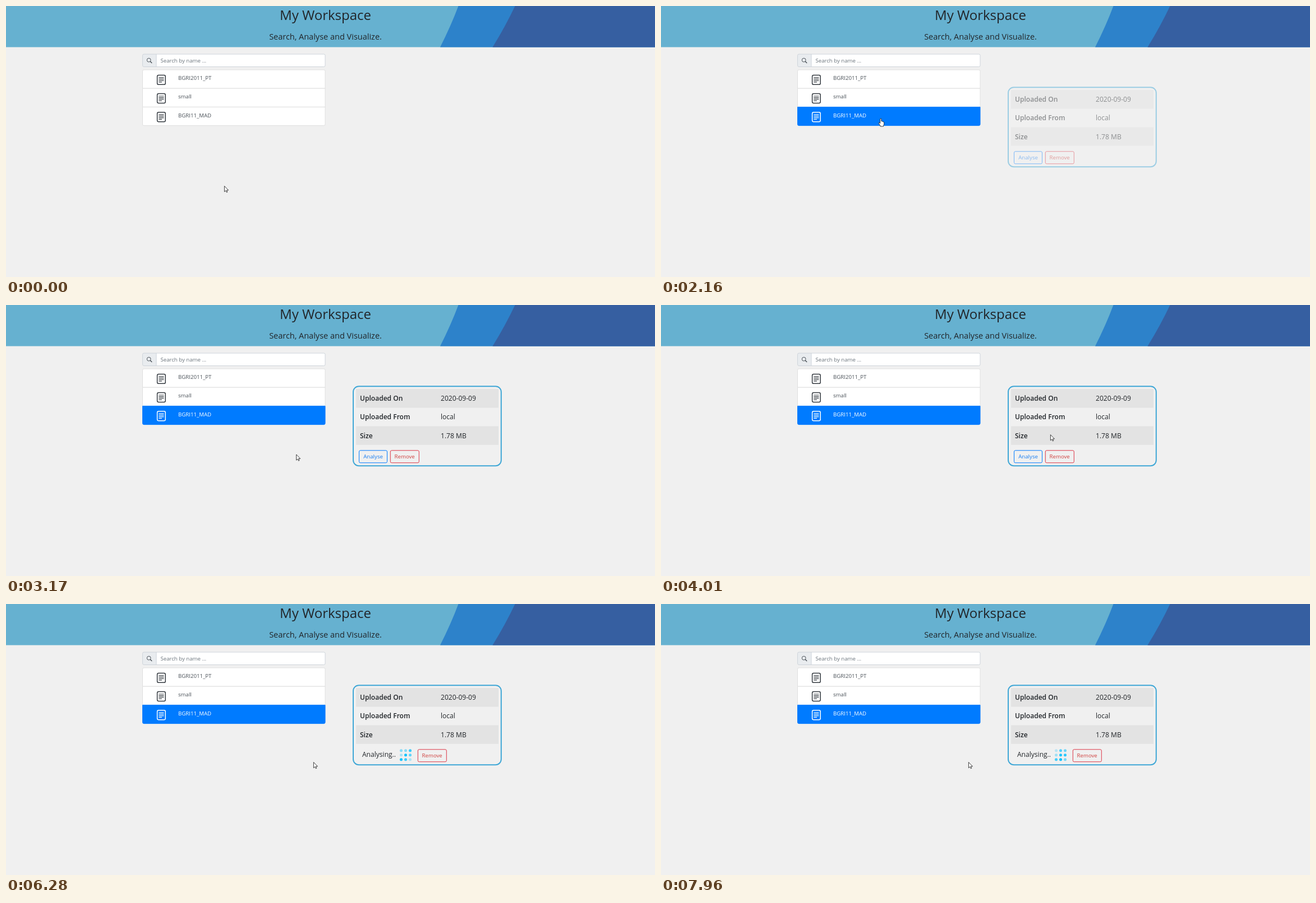
These frames come from a looping animation (1157 px wide and 484 px high, 8000 ms). An HTML page:

```html
<!DOCTYPE html>
<html lang="en">
<head>
<meta charset="utf-8">
<title>My Workspace</title>
<style>
  html, body { margin: 0; width: 100%; height: 100%; overflow: hidden; background: #f0f0f0; }
  svg { display: block; width: 1157px; height: 484px; }
  text { font: 9.65px "Open Sans", "Noto Sans", sans-serif; fill: #212529; white-space: pre; }
  .title { font-size: 24px; }
  .lead { font-size: 14.5px; }
  .cell { font-size: 12.05px; }
  .head { font-weight: 600; }
  .hint { fill: #6c757d; }
  .row text { fill: #495057; }
  .row .icon { fill: none; stroke: #343a40; }
  .row.on .icon { stroke: #fff; }
  .row.on text { fill: #fff; font-weight: 500; }
  .remove rect { fill: none; stroke: #dc3545; }
  .remove text { fill: #d0413f; }
</style>
</head>
<body>
<svg viewBox="0 0 1157 484">
  <defs>
    <g id="doc">
      <rect x=".8" y=".8" width="14.6" height="16.9" rx="2.4" stroke-width="1.5"/>
      <path d="M3.6 5.2h9M3.6 7.9h9M3.6 10.6h9M3.6 13.3h5.5" stroke-width="1.2"/>
    </g>
  </defs>

  <rect width="1157" height="484" fill="#f0f0f0"/>
  <rect width="1157" height="73.5" fill="#66b1d0"/>
  <path d="M806.5 0Q793 36 774 73.5H1157V0z" fill="#2d82ca"/>
  <path d="M907.5 0Q890 37 867.5 73.5H1157V0z" fill="#365fa1"/>
  <text class="title" x="569.5" y="25" text-anchor="middle">My Workspace</text>
  <text class="lead" x="569.5" y="59.5" text-anchor="middle">Search, Analyse and Visualize.</text>

  <rect x="243.5" y="86" width="325.5" height="22.5" rx="2.4" fill="#fff"/>
  <path d="M268 86h-22a2.4 2.4 0 0 0-2.5 2.4v17.7a2.4 2.4 0 0 0 2.5 2.4h22z" fill="#e9ecef"/>
  <path d="M268 86v22.5" stroke="#ced4da"/>
  <rect x="243.5" y="86" width="325.5" height="22.5" rx="2.4" fill="none" stroke="#ced4da"/>
  <g fill="none" stroke="#495057">
    <circle cx="254.7" cy="96.6" r="3.4"/>
    <path d="M257.2 99.1l3 3" stroke-width="1.4"/>
  </g>
  <text class="hint" x="275.5" y="101">Search by name ...</text>

  <g id="list"></g>

  <g id="panel">
    <rect x="619" y="145.2" width="263.8" height="142" rx="10" fill="none" stroke="#3fa7d6" stroke-width="2"/>
    <path d="M624 150h254v33.4h-254zM624 216.4h254v33.3h-254z" fill="#e3e3e3"/>
    <g id="cells"></g>
    <g id="analyse">
      <rect x="629.5" y="259.8" width="50" height="22" rx="2.2" stroke="#007bff"/>
      <text x="654.6" y="274" text-anchor="middle">Analyse</text>
    </g>
    <g id="busy">
      <text class="cell" x="635" y="272.5">Analysing..</text>
      <g id="dots" fill="#00bfff"></g>
    </g>
    <g id="remove" class="remove">
      <rect x="685.3" y="259.8" width="51" height="22" rx="2.2"/>
      <text x="710.7" y="274" text-anchor="middle">Remove</text>
    </g>
  </g>

  <g id="cursor">
    <path id="arrow" d="M.4.6v10.2l2.3-2.2 1.6 3.3 1.5-.7-1.5-3.2h3.2z" fill="#fff" stroke="#111" stroke-width=".8"/>
    <path id="hand" d="M-1.1 1Q-1.1 0 0 0T1.1 1V4.8Q2.2 4.2 2.8 5.2 4 4.8 4.4 5.9 5.8 5.7 5.8 7.2V9.8Q5.7 11.4 4.8 12.4V14H-.8V12.7Q-2.2 11.4-3.6 8.4-4 7.2-2.9 7.1-2 7.2-1.1 8.6z" fill="#fff" stroke="#111" stroke-width=".8"/>
    <path id="beam" d="M-2-4.5h1.4l.6.5.6-.5H2M0-4v8M-2 4.5h1.4l.6-.5.6.5H2" fill="none" stroke="#222" stroke-width=".9"/>
  </g>
</svg>
<script>
const LOOP = 8000, SELECT = 2090, START = 4700, SPIN = 4795, SPIN_TIME = 900;
const $ = id => document.getElementById(id);
const clamp = v => Math.max(0, Math.min(1, v));
const show = (el, on) => el.setAttribute('visibility', on ? 'visible' : 'hidden');

// time, x, y of the pointer's hot spot
const stops = [
  [0, 389, 321], [940, 389, 321], [1200, 401, 288], [1460, 403.5, 242.5],
  [1730, 392, 204], [1790, 391.8, 201], [2540, 391.8, 201], [2900, 455, 236],
  [3290, 529, 272], [3360, 529, 272], [3650, 600, 250], [3860, 680, 224],
  [4010, 694, 231], [4160, 684, 254], [4400, 666, 276], [4820, 666, 276],
  [5000, 610, 291], [5200, 518, 295], [5460, 548, 282], [LOOP, 548, 282]
];

const names = ['BGRI2011_PT', 'small', 'BGRI11_MAD'];
$('list').innerHTML = names.map((name, i) => {
  const y = 114 + i * 33.2;
  const low = y + 33.2;
  const shape = i === 0 ? `M243.5 ${low}V${y + 2.4}q0-2.4 2.4-2.4H566.6q2.4 0 2.4 2.4V${low}z`
    : i === 1 ? `M243.5 ${y}H569V${low}H243.5z`
    : `M243.5 ${y}H569V${low - 2.4}q0 2.4-2.4 2.4H245.9q-2.4 0-2.4-2.4z`;
  return `<g class="row"><path class="back" d="${shape}" fill="#fff" stroke="#dfdfdf"/>
    <use class="icon" href="#doc" x="268.8" y="${y + 8.6}"/>
    <text x="307" y="${y + 18.2}">${name}</text></g>`;
}).join('');
const row = $('list').lastElementChild;
const rowBack = row.querySelector('.back');

const facts = [['Uploaded On', '2020-09-09'], ['Uploaded From', 'local'], ['Size', '1.78 MB']];
$('cells').innerHTML = facts.map(([key, value], i) => {
  const y = 171.2 + i * 33.2;
  return `<text class="cell head" x="631" y="${y}">${key}</text><text class="cell" x="775" y="${y}">${value}</text>`;
}).join('');

// delays of the nine dots, row by row, as parts of a cycle
const delays = [0, .3, .8, .1, .6, .4, .7, .5, .2];
$('dots').innerHTML = delays.map((d, i) =>
  `<circle cx="${704.5 + i % 3 * 8}" cy="${261.8 + Math.floor(i / 3) * 8}" r="2.55"/>`).join('');
const dots = [...$('dots').children];

function slope(i, axis) {
  const a = stops[i - 1], b = stops[i], c = stops[i + 1];
  if (!a || !c) return 0;
  const still = (p, q) => p[1] === q[1] && p[2] === q[2];
  if (still(a, b) || still(b, c)) return 0;
  return (c[axis] - a[axis]) / (c[0] - a[0]);
}

function pointerAt(t) {
  const i = stops.findIndex((s, k) => k < stops.length - 1 && t < stops[k + 1][0]);
  const a = stops[i], b = stops[i + 1], span = b[0] - a[0], u = (t - a[0]) / span;
  return [1, 2].map(axis => {
    const m = slope(i, axis) * span, n = slope(i + 1, axis) * span;
    return a[axis] * (1 + 2 * u) * (1 - u) ** 2 + m * u * (1 - u) ** 2
      + b[axis] * u * u * (3 - 2 * u) + n * u * u * (u - 1);
  });
}

const inside = (x, y, l, top, r, low) => x >= l && x <= r && y >= top && y <= low;

function draw(t) {
  const [x, y] = pointerAt(t);
  const busy = t >= START, picked = t >= SELECT;
  const overRow = inside(x, y, 243, 180, 569, 213.5);
  const overButton = !busy && picked && inside(x, y, 629, 259, 680, 282);
  const overText = busy && inside(x, y, 635, 260, 695, 278);

  row.classList.toggle('on', picked);
  rowBack.setAttribute('fill', picked ? '#007bff' : overRow ? '#f8f9fa' : '#fff');
  rowBack.setAttribute('stroke', picked ? '#007bff' : '#dfdfdf');
  $('panel').setAttribute('opacity', clamp((t - SELECT) / 150));

  show($('analyse'), !busy);
  show($('busy'), busy);
  $('remove').setAttribute('transform', `translate(${busy ? 49 : 0})`);
  const [box, label] = $('analyse').children;
  box.setAttribute('fill', overButton ? '#007bff' : 'none');
  label.style.fill = overButton ? '#fff' : '#1a7ef0';

  dots.forEach((dot, i) => {
    const p = (t - SPIN) / SPIN_TIME - delays[i];
    dot.setAttribute('opacity', p < 0 ? 1 : .2 + .8 * Math.abs(1 - 2 * (p % 1)));
  });

  $('cursor').setAttribute('transform', `translate(${x.toFixed(1)} ${y.toFixed(1)})`);
  show($('hand'), overRow || overButton);
  show($('beam'), overText);
  show($('arrow'), !overRow && !overButton && !overText);
}

const begin = performance.now();
function tick() {
  draw((performance.now() - begin) % LOOP);
  requestAnimationFrame(tick);
}
tick();
</script>
</body>
</html>
```
